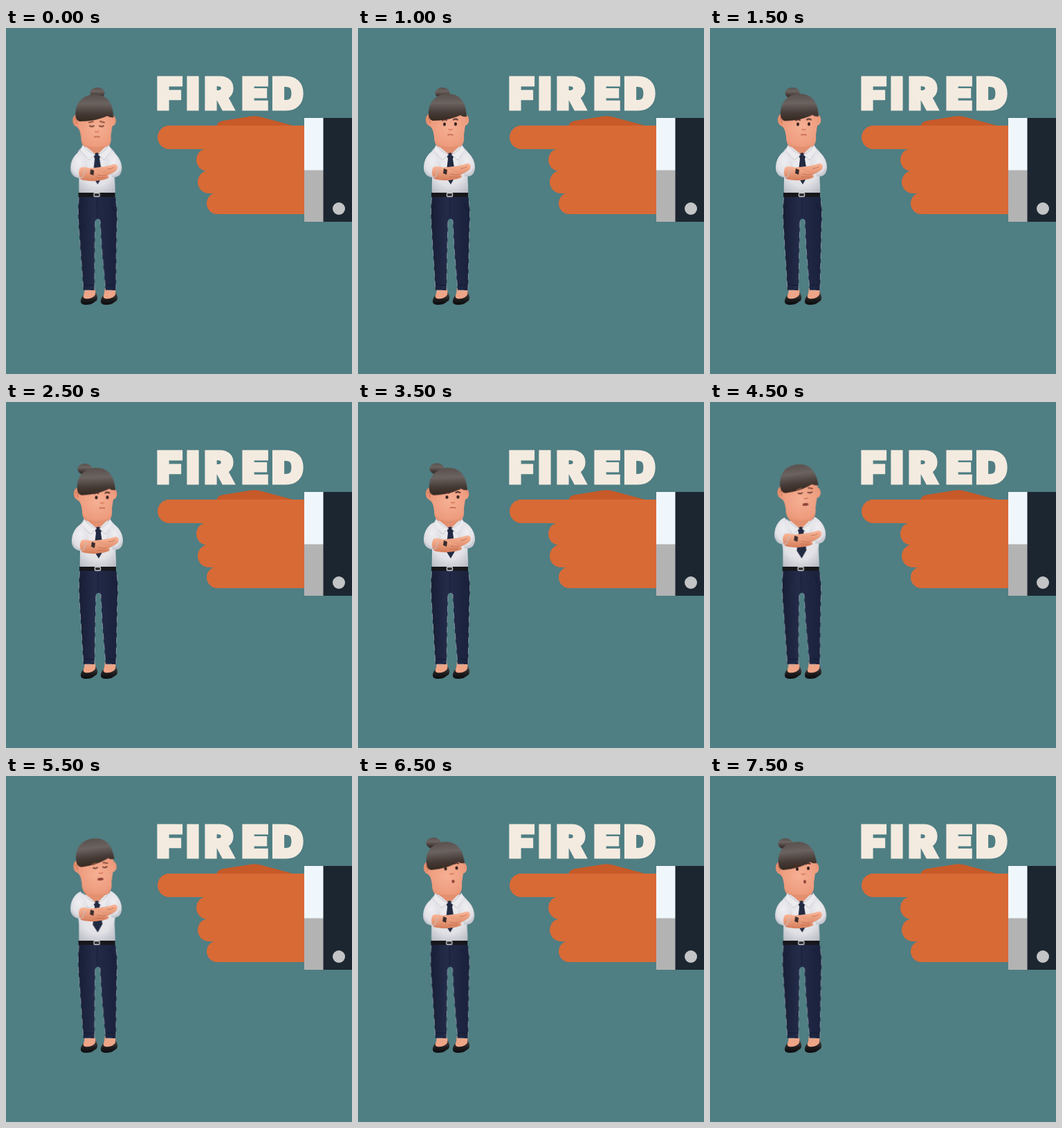
An HTML page without scripts for the animation above (8 s loop, 500 by 500 pixels).

```html
<!DOCTYPE html>
<html lang="en">
<head>
<meta charset="utf-8">
<title>Fired</title>
<style>
html, body { margin: 0; width: 100%; height: 100%; overflow: hidden; background: #4f7e83; }
svg { display: block; width: 100vw; height: 100vh; }
.title {
  font: 900 62px Inter, "Open Sans", sans-serif;
  fill: #f4ebe0; stroke: #f4ebe0; stroke-width: 5; stroke-linejoin: miter;
}

/* every pose holds for half a second */
.move { animation: 8s step-end infinite; }
.body { animation-name: sway; transform-origin: 132px 395px; }
.arms { animation-name: arms; }
.head { animation-name: head; }
.hair { animation-name: tilt; transform-origin: 130px 125px; }
.bun { animation-name: bun; }
.look { animation-name: look; }
.open { animation-name: open; }
.shut { animation-name: shut; }
.calm { animation-name: calm; }
.sigh { animation-name: sigh; }
.pout { animation-name: pout; }

@keyframes sway {
  0% { transform: skewX(.5deg); }
  6.25% { transform: skewX(.25deg); }
  12.5%, 43.75% { transform: none; }
  50% { transform: skewX(.3deg); }
  56.25%, 68.75% { transform: skewX(.5deg); }
  75% { transform: skewX(.4deg); }
  81.25%, 100% { transform: skewX(.25deg); }
}
@keyframes arms {
  0% { transform: translateY(1px); }
  12.5% { transform: none; }
  31.25% { transform: translateY(-1px); }
  43.75% { transform: translateY(-3px); }
  50% { transform: translateY(-6px); }
  56.25%, 68.75% { transform: translateY(-10px); }
  75% { transform: translateY(-5px); }
  81.25%, 100% { transform: none; }
}
@keyframes head {
  0% { transform: translate(-1.5px, 1px); }
  6.25% { transform: translate(-.5px, .5px); }
  12.5%, 50% { transform: none; }
  56.25%, 68.75% { transform: translate(-.5px, -2px); }
  75% { transform: translate(-1.5px, -1px); }
  81.25%, 100% { transform: translate(-3px, 0); }
}
@keyframes tilt {
  0%, 12.5% { transform: none; }
  18.75% { transform: rotate(-1deg); }
  25% { transform: rotate(-2deg); }
  31.25%, 43.75% { transform: translateX(1px) rotate(-2deg); }
  50% { transform: translateY(-1px) rotate(-4deg); }
  56.25%, 68.75% { transform: translateY(-3px) rotate(-7deg); }
  75% { transform: translateY(-1px) rotate(-6deg); }
  81.25%, 100% { transform: rotate(-5deg); }
}
@keyframes bun {
  0% { transform: translate(132px, 94px); }
  6.25% { transform: translate(127px, 94px); }
  12.5% { transform: translate(122px, 94px); }
  18.75% { transform: translate(119px, 94px); }
  25% { transform: translate(116px, 95.5px); }
  31.25% { transform: translate(114px, 97px); }
  37.5% { transform: translate(114px, 98px); }
  43.75% { transform: translate(114px, 96.5px); }
  50% { transform: translate(113px, 97px); }
  56.25% { transform: translate(117px, 102px); }
  62.5% { transform: translate(117px, 103px); }
  68.75% { transform: translate(117px, 105px); }
  75% { transform: translate(111px, 100px); }
  81.25% { transform: translate(109px, 97px); }
  93.75%, 100% { transform: translate(109px, 98px); }
}
@keyframes look {
  0% { transform: translate(131px, 141.5px); }
  6.25% { transform: translate(131px, 140px); }
  12.5% { transform: translate(133px, 138.5px); }
  18.75% { transform: translate(135px, 138.5px); }
  25% { transform: translate(137px, 138px); }
  31.25% { transform: translate(138.5px, 137.5px); }
  37.5% { transform: translate(138px, 138px); }
  43.75% { transform: translate(136.5px, 137px); }
  50% { transform: translate(137px, 134px); }
  56.25% { transform: translate(137.5px, 131px) rotate(-5deg); }
  68.75% { transform: translate(136px, 132px) rotate(-5deg); }
  75% { transform: translate(136px, 132px) rotate(-3deg); }
  81.25% { transform: translate(134.5px, 133px) rotate(-3deg); }
  93.75%, 100% { transform: translate(134px, 133.5px) rotate(-3deg); }
}
@keyframes open {
  0%, 56.25% { opacity: 0; }
  6.25%, 75%, 100% { opacity: 1; }
}
@keyframes shut {
  0%, 56.25% { opacity: 1; }
  6.25%, 75%, 100% { opacity: 0; }
}
@keyframes calm {
  0% { opacity: 1; }
  56.25%, 100% { opacity: 0; }
}
@keyframes sigh {
  0%, 75%, 100% { opacity: 0; }
  56.25% { opacity: 1; }
}
@keyframes pout {
  0% { opacity: 0; }
  75%, 100% { opacity: 1; }
}
</style>
</head>
<body>
<svg viewBox="0 0 500 500" preserveAspectRatio="none">
  <defs>
    <radialGradient id="skin" cx=".55" cy=".5" r=".65">
      <stop offset="0" stop-color="#f6b094"/>
      <stop offset=".65" stop-color="#ee9c7e"/>
      <stop offset="1" stop-color="#d9805f"/>
    </radialGradient>
    <linearGradient id="arm" x2="0" y2="1">
      <stop offset="0" stop-color="#f9b698"/>
      <stop offset="1" stop-color="#d57c59"/>
    </linearGradient>
    <linearGradient id="hair" x2="0" y2="1">
      <stop offset="0" stop-color="#59504d"/>
      <stop offset=".35" stop-color="#6b6360"/>
      <stop offset=".7" stop-color="#463b37"/>
      <stop offset="1" stop-color="#35281f"/>
    </linearGradient>
    <radialGradient id="shirt" cx=".5" cy=".4" r=".7">
      <stop offset="0" stop-color="#efeef1"/>
      <stop offset=".6" stop-color="#e1e1e6"/>
      <stop offset="1" stop-color="#b9bcc5"/>
    </radialGradient>
    <linearGradient id="cloth">
      <stop offset="0" stop-color="#181e36"/>
      <stop offset=".4" stop-color="#232b48"/>
      <stop offset="1" stop-color="#1a213c"/>
    </linearGradient>
    <linearGradient id="sole" x2="0" y2="1">
      <stop offset="0" stop-color="#55504f"/>
      <stop offset=".6" stop-color="#1d1c1e"/>
      <stop offset="1" stop-color="#0c0c0e"/>
    </linearGradient>
    <g id="foot">
      <path d="M-12 394C-11 388-7 385-5 383L9 381Q14 388 11 394C6 397 4 400-4 400Q-13 400-12 394Z" fill="url(#sole)"/>
      <path d="M-6 376H8Q11 383 8 387C4 391-1 392-6 391Q-10 389-7 384Z" fill="#efa587"/>
    </g>
  </defs>

  <rect width="500" height="500" fill="#4f7e83"/>
  <text class="title" x="218 261 287 341 384.500" y="116.500">FIRED</text>

  <g fill="#d86a36">
    <path d="M304 142Q306 135 314 134L352 128Q361 126 370 129L418 142Z" fill="#c75a28"/>
    <rect x="219" y="141" width="140" height="34" rx="17"/>
    <rect x="275" y="174" width="90" height="33" rx="16.5"/>
    <rect x="277" y="206" width="90" height="33" rx="16.5"/>
    <rect x="290" y="238" width="90" height="31" rx="15.5"/>
    <path d="M300 141H432V269H306V238H294V174H290V150Z"/>
  </g>
  <path d="M431 130h28v76h-28z" fill="#f0f7fc"/>
  <path d="M431 205.500h28V280h-28z" fill="#b3b3b4"/>
  <path d="M458.500 130H500V280h-41.500z" fill="#1c2630"/>
  <circle cx="481" cy="261" r="9" fill="#c3c4c6"/>

  <g class="move head">
    <path d="M103 124C96 126 96 140 104 142C108 145 109 150 110 157C110 166 113 171 119 175H146C152 170 154 163 153 155L155 141C162 139 162 128 156 125L152 112H110Z" fill="url(#skin)"/>
    <path d="M101 130q4 3 3 8" fill="none" stroke="#c9704f"/>
  </g>

  <g class="move body">
    <use href="#foot" x="120"/>
    <use href="#foot" x="149"/>
    <path d="M107 242H159Q163 262 161 288L159 379H144L139 318L137 278Q133 274 130 278L129 318L128 379H112L107 300Q104 262 107 242Z" fill="url(#cloth)" stroke="#9fadb6" stroke-width=".7" stroke-dasharray="9 6"/>
    <path d="M112 371.500h16M144 371.500h14" stroke="#141a34"/>
    <path d="M114 250q-4 10-6 16M152 250q4 10 6 16M133 246v28" fill="none" stroke="#171d36"/>

    <path d="M114 171C105 176 102 184 104 198C109 210 106 225 107 240H159C160 222 156 212 161 199C163 184 160 177 149 171Q132 176 114 171Z" fill="url(#shirt)"/>
    <path d="M106 238h53v6h-53z" fill="#17171b"/>
    <rect x="128.500" y="238.500" width="8" height="5" rx="1" fill="#25252a" stroke="#c9c9cc" stroke-width="1.400"/>
    <path d="M116 170Q132 174 147 170L133 184Z" fill="#e2906f"/>
    <path d="M128 183L133 180L139 183L137 189L141 214L134 226L127 215L130 189Z" fill="#222a42"/>
    <path d="M113 169Q118 178 131 183L122 191L109 177ZM150 169Q147 178 135 183L144 191L155 176Z" fill="#ebebee" stroke="#bcbec7" stroke-width=".7"/>

    <g class="move arms">
      <path d="M110 177C101 180 94 192 95 204C96 213 105 218 112 215L120 202Q117 187 110 177Z" fill="url(#shirt)"/>
      <path d="M153 176C162 180 169 191 169 201C169 211 163 216 155 214L145 200Q148 185 153 176Z" fill="url(#shirt)"/>
      <path d="M111 204C122 200 140 202 157 196C162 195 165 200 161 205C150 213 134 219 115 219Q106 214 111 204Z" fill="url(#arm)"/>
      <path d="M109 201C116 198 127 203 147 211Q153 215 147 217C135 221 120 221 110 218Q104 209 109 201Z" fill="url(#arm)"/>
      <path d="M134 211q6 2 12 1M132 215q7 1 13 0M148 203q6 0 10-3" fill="none" stroke="#bd6d4e" stroke-width=".8"/>
      <path d="M124 203l5 2-1 7-5-2z" fill="#3a2c2c"/>
      <path d="M97 207q7 10 15 8l4-11M167 205q-5 9-13 9" fill="none" stroke="#c0c2ca"/>
    </g>
  </g>

  <g class="move bun">
    <ellipse rx="10.500" ry="8" fill="url(#hair)"/>
    <path d="M-7 3Q0 7 8 3" fill="none" stroke="#3b322f"/>
  </g>
  <g class="move head">
    <g class="move hair">
      <path d="M102 126C101 107 112 96 129 95C147 95 156 106 157 128Q152 129 148 126C138 131 122 134 108 134Q102 132 102 126Z" fill="url(#hair)"/>
    </g>
  </g>

  <g class="move look" fill="none" stroke-linecap="round">
    <g class="move open">
      <path d="M-11-5Q-8-7-5-5.500M5-6Q8-8 11-6" stroke="#4d302a" stroke-width="2"/>
      <ellipse cx="-8" cy=".5" rx="2" ry="2.500" fill="#2c1c1b"/>
      <ellipse cx="8" cy=".3" rx="2" ry="2.500" fill="#2c1c1b"/>
    </g>
    <g class="move shut">
      <path d="M-11-5L-5-6.500M5-6.500L11-5" stroke="#8f5440" stroke-width="2"/>
      <path d="M-10 0Q-7 1.500-4 0M4 0Q7 1.500 10 0" stroke="#6b3c30" stroke-width="1.800"/>
    </g>
    <path d="M-2 8Q0 9.500 3 8" stroke="#d7795a" stroke-width="1.600"/>
    <path class="move calm" d="M-3 16Q0 14.800 4 16" stroke="#b5583f" stroke-width="1.400"/>
    <ellipse class="move sigh" cx="-1" cy="17" rx="4.500" ry="2" fill="#93443a"/>
    <ellipse class="move pout" cx="2" cy="19.500" rx="2" ry="2.400" fill="#8f3f36"/>
  </g>
</svg>
</body>
</html>
```
